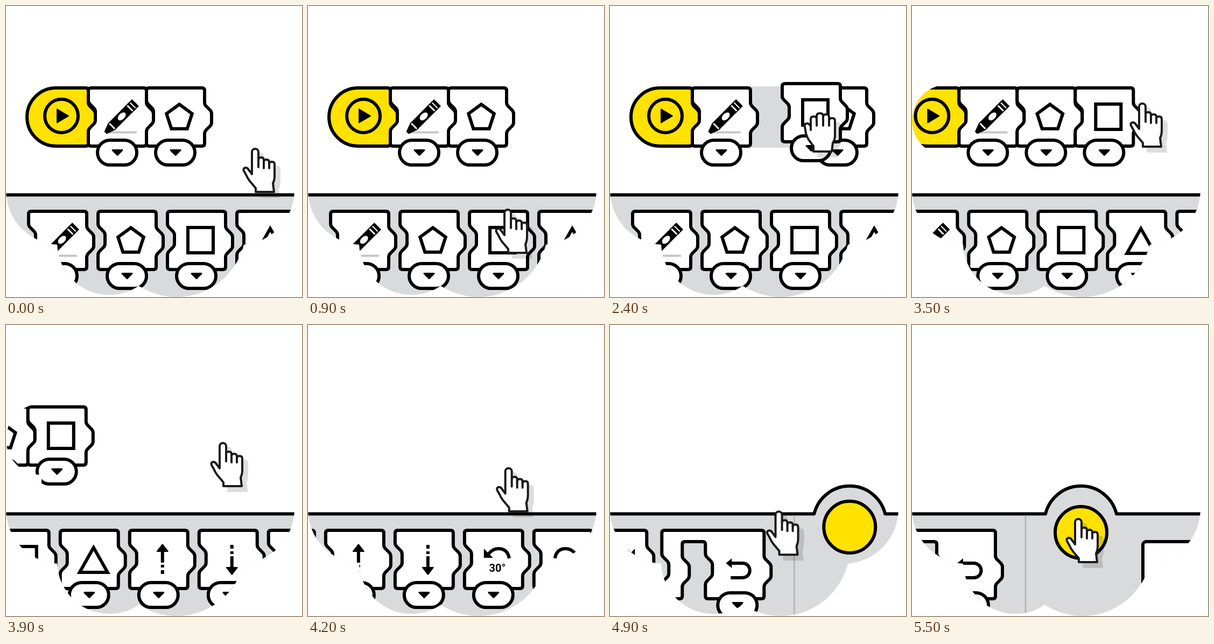
Animation of 550x540 px, one loop 7.5 s. Source, as an HTML page:

```html
<!DOCTYPE html>
<html lang="en">
<head>
<meta charset="utf-8">
<title>Block coding</title>
<style>
html, body { margin: 0; width: 100%; height: 100%; overflow: hidden; background: #fff; }
svg { display: block; width: 100%; height: 100%; }
.b { fill: #fff; stroke: #000; stroke-width: 6; stroke-linejoin: round; }
.l { fill: none; stroke: #000; stroke-width: 6; }
.hand { fill: #fff; stroke: #1c1a1b; stroke-width: 4; stroke-linejoin: round; stroke-linecap: round; }
text { font: bold 20px Roboto, Arial, sans-serif; text-anchor: middle; }
</style>
</head>
<body>
<svg id="stage" viewBox="0 0 550 540"></svg>
<script>
const LOOP = 7500, STEP = 100;
const GRAY = '#d9dadb', YELLOW = '#ffe200';
const ROW_X = 153, ROW_Y = 152, SLOT = 108;
const PAL_X = 42, PAL_Y = 381, PAL_GAP = 129;
const SCROLL_START = 3400, SCROLL_END = 5100, SCROLL = 1116;
const GRAB = 1200, DROP = 2900;

const at = (x, y, body, id = '') =>
  `<g ${id && `id="${id}"`} transform="translate(${x} ${y})">${body}</g>`;

// Relative tab going down / notch going up, 54 tall and 13 wide.
const TAB = 'q0 4 3 7l7 7q3 3 3 7v16q0 4-3 7l-7 7q-3 3-3 7';
const NOTCH = 'q0-4 3-7l7-7q3-3 3-7v-16q0-4-3-7l-7-7q-3-3-3-7';
const BODY = `M5 0H103Q108 0 108 5V27${TAB}V103Q108 108 103 108H5Q0 108 0 103V81${NOTCH}V5Q0 0 5 0Z`;

const pill = (x = 17, y = 97) => at(x, y,
  `<rect class="b" width="73" height="46" rx="23"/>
   <path d="M28 18.5H46L37 27.5Z" stroke="#000" stroke-width="3" stroke-linejoin="round"/>`);

const pentagon = () => {
  const pts = [0, 1, 2, 3, 4].map(i => {
    const a = i * Math.PI * 0.4;
    return `${(61 + 25 * Math.sin(a)).toFixed(1)},${(55.5 - 25 * Math.cos(a)).toFixed(1)}`;
  });
  return `<polygon class="l" points="${pts.join(' ')}"/>`;
};
const upArrow = `<path d="M61 26L71 39H51Z" stroke="#000" stroke-width="2" stroke-linejoin="round"/>
  <path class="l" d="M61 37V60M61 64V69M61 74V81"/>`;
const turnArrow = `<path class="l" d="M39 52Q42 34 59 34Q71 34 79 46"/><path d="M86 34V51H69Z"/>`;
const degrees = '<text x="61" y="77">30°</text>';

const ICONS = {
  crayon: `<path d="M35 82.5H90" stroke="#c6c6c6" stroke-width="4"/>
    <g transform="translate(60 55) rotate(-45)">
      <path d="M-40-3L-24-9V9L-40 3ZM-21-9H23V9H-21ZM26-9H31V9H26ZM33-9H39V9H33Z"/>
      <path d="M-24-8H-20M-24 8H-20M22-8H34M22 8H34" stroke="#000" stroke-width="2"/>
      <ellipse cx="3" rx="9" ry="5.5" fill="#fff"/>
    </g>`,
  pentagon: pentagon(),
  square: '<rect class="l" x="38" y="30" width="47" height="47"/>',
  triangle: '<path class="l" d="M62 32L36 78H88Z"/>',
  up: upArrow,
  down: `<g transform="matrix(1 0 0 -1 0 108)">${upArrow}</g>`,
  left: `<g transform="matrix(-1 0 0 1 122 0)">${turnArrow}</g>${degrees}`,
  right: turnArrow + degrees
};
const block = name => `<path class="b" d="${BODY}"/>${ICONS[name]}${pill()}`;

const startBlock = `<path class="b" style="fill:${YELLOW}"
    d="M93 152H148Q153 152 153 157V179${TAB}V255Q153 260 148 260H93A54 54 0 0 1 93 152Z"/>
  <circle class="l" cx="103" cy="204" r="31"/>
  <path d="M95 191.5V216.5L116 204Z" stroke="#000" stroke-width="2" stroke-linejoin="round"/>`;

const loopBlock = `<path class="b" d="M5 0H185Q190 0 190 5V47${TAB}V122Q190 127 185 127H86Q81 127 81 122V101${NOTCH}V26
    Q81 21 76 21H43Q38 21 38 26V47${TAB}V122Q38 127 33 127H5Q0 127 0 122V101${NOTCH}V5Q0 0 5 0Z"/>
  <path class="l" d="M127 61H150A13.5 13.5 0 0 1 150 88H128"/>
  <path d="M119 61L130 52V70Z"/>${pill(104, 116)}`;

const palette = `<path class="b" style="fill:${GRAY}"
    d="M-20 350.5H1364A68 68 0 0 1 1496 350.5H2200V600H-20Z"/>
  ${Object.keys(ICONS).map((n, i) => at(PAL_X + i * PAL_GAP, PAL_Y, block(n))).join('')}
  ${at(1081, PAL_Y, loopBlock)}
  <path d="M1327 353.5V545" stroke="#b0b1b2" stroke-width="2.5"/>
  <rect class="b" x="1545" y="402" width="400" height="200" rx="6"/>
  <circle id="button" class="b" style="fill:${YELLOW}" cx="1430" r="48"/>`;

const POINT = `M-6 46V8a6 6 0 0 1 12 0V22q0-4 5-4t5 5V26q0-4 5-4t5 5V30q0-4 5-4t5 5V52q0 8-3 14L35 82H1V75
  L-10 62Q-14 57-17 50L-21 43Q-23 38-18 37Q-14 37-12 41L-6 49Z`;
const GRIP = `M-4 42V22q0-5 5.5-5t5.5 5V16q0-5 6-5t6 5V18q0-5 5.5-5t5.5 5V25q0-5 5.5-5t5.5 5V52q0 8-4 14
  L35 82H1V72L-8 60Q-11 55-13 48L-15 36Q-16 30-11 30Q-6 30-4 36Z`;
const hand = (id, shape, creases) =>
  `<g id="${id}"><path d="${shape}" transform="translate(9 9)" stroke="#000" stroke-width="4" opacity=".13"/>
   <path class="hand" d="${shape}"/><path class="hand" d="${creases}"/></g>`;

const stage = document.getElementById('stage');
stage.innerHTML = `<defs>
  <clipPath id="rowClip"><circle cx="66" cy="212" r="66"/><rect x="66" y="100" width="484" height="220"/></clipPath>
  <clipPath id="palClip">
    <circle cx="101" cy="342" r="101"/><circle cx="434" cy="341" r="102"/>
    <circle cx="192" cy="439" r="97"/><circle cx="317" cy="411" r="129"/>
    <rect y="280" width="536" height="63"/><rect x="101" y="340" width="333" height="100"/>
  </clipPath></defs>
  <g clip-path="url(#palClip)"><g id="palette">${palette}</g></g>
  <g clip-path="url(#rowClip)"><g id="row">
    <path id="gap" d="${BODY}" fill="${GRAY}" stroke="${GRAY}" stroke-width="6"/>
    ${startBlock}${at(ROW_X, ROW_Y, block('crayon'))}
    ${at(0, 0, block('pentagon'), 'second')}
    ${at(ROW_X + 2 * SLOT, ROW_Y, block('square'), 'third')}
  </g></g>
  ${at(0, 0, block('square'), 'drag')}
  <g id="cursor">
    ${hand('point', POINT, 'M6 22V36M16 25V38M26 29V38')}
    ${hand('grip', GRIP, 'M7 22V34M19 17V34M30 18V34')}
  </g>`;

const el = {};
stage.querySelectorAll('g[id],path[id],circle[id]').forEach(e => el[e.id] = e);
const move = (e, x, y) => e.setAttribute('transform', `translate(${x.toFixed(2)} ${y.toFixed(2)})`);
const show = (e, on) => e.setAttribute('display', on ? 'inline' : 'none');
const ramp = (t, a, b) => Math.min(1, Math.max(0, (t - a) / (b - a)));

// Smooth curve through [time, x, y] keys, at rest at both ends.
function follow(keys, t) {
  const last = keys.length - 1;
  if (t <= keys[0][0]) return keys[0].slice(1);
  if (t >= keys[last][0]) return keys[last].slice(1);
  const i = keys.findIndex(k => k[0] > t) - 1;
  const a = keys[i], b = keys[i + 1], d = b[0] - a[0], u = (t - a[0]) / d;
  const slope = (j, c) => j === 0 || j === last ? 0 :
    (keys[j + 1][c] - keys[j - 1][c]) / (keys[j + 1][0] - keys[j - 1][0]);
  return [1, 2].map(c =>
    a[c] + (b[c] - a[c]) * u * u * (3 - 2 * u) +
    d * u * (1 - u) * (slope(i, c) * (1 - u) - slope(i + 1, c) * u));
}

const REACH = [[300, 463, 263], [1100, 354, 397]];
const CARRY = [[GRAB, 297, 354], [1700, 260, 334], [1900, 237, 275], [2400, 320, 144], [2700, 368, 135], [2800, 376, 135]];
const LEAVE = [[DROP, 434, 178], [3500, 428, 179], [3900, 403, 217], [4300, 362, 280], [4600, 331, 326], [5100, 309, 348]];

function draw(time) {
  const t = Math.floor(time / STEP) * STEP;
  const held = t >= GRAB && t < DROP;
  const scroll = SCROLL * ramp(t, SCROLL_START, SCROLL_END);
  const press = 10 * ramp(t, 5200, 5500);
  const shift = SLOT * (ramp(t, 2000, 2300) - ramp(t, 2500, 2700));

  move(el.palette, -scroll, 0);
  move(el.row, -scroll, 0);
  move(el.second, ROW_X + SLOT + shift, ROW_Y);
  move(el.gap, ROW_X + SLOT * (shift > SLOT / 2 ? 1 : 2), ROW_Y);
  show(el.gap, t >= 2100 && t < DROP);
  show(el.third, t >= DROP);
  el.button.setAttribute('cy', 375 + press);

  const [bx, by] = follow(CARRY, t);
  move(el.drag, bx, by);
  show(el.drag, held);

  const [hx, hy] = held ? [bx + 57, by + 44] : follow(t < GRAB ? REACH : LEAVE, t);
  move(el.cursor, hx, hy + press);
  show(el.point, !held);
  show(el.grip, held);
}

const begin = performance.now();
function tick() {
  draw((performance.now() - begin) % LOOP);
  requestAnimationFrame(tick);
}
tick();
</script>
</body>
</html>
```
